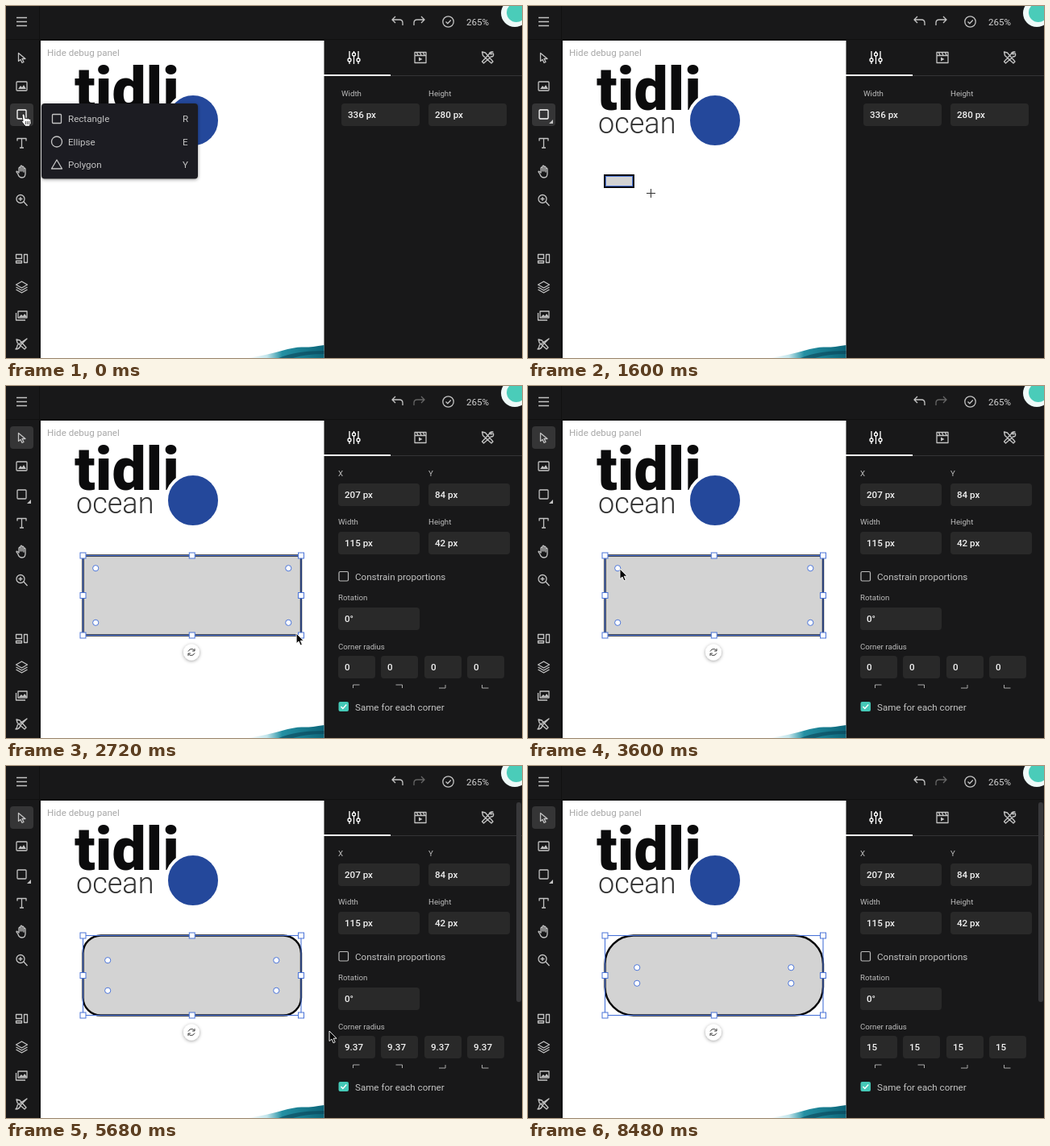
An HTML page for the animation above (9980 ms loop, 640x437 px).

```html
<!DOCTYPE html>
<html lang="en">
<head>
<meta charset="utf-8">
<title>Rounded rectangle in a design editor</title>
<style>
  html, body { margin: 0; width: 100%; height: 100%; overflow: hidden; background: #181819; }
  svg { display: block; width: 640px; height: 437px; font: 11.6px Roboto, sans-serif; }
  .icon { fill: none; stroke: #c4c4c4; stroke-width: 1.3; stroke-linejoin: round; }
  .solid { fill: #c4c4c4; stroke: none; }
  .bright { stroke: #fff; }
  .label { font-size: 9.7px; fill: #bcbcbc; }
  .value { font-weight: 500; fill: #f2f2f2; }
  .option { fill: #c4c4c4; }
  .handle { fill: #fff; stroke: #4a74d8; }
</style>
</head>
<body>
<svg viewBox="0 0 640 437">
  <defs>
    <linearGradient id="sea">
      <stop offset="0" stop-color="#fff"/>
      <stop offset=".25" stop-color="#c3e6ec"/>
      <stop offset=".45" stop-color="#2490a3"/>
      <stop offset="1" stop-color="#0d667a"/>
    </linearGradient>
    <filter id="shadow" x="-30%" y="-30%" width="160%" height="160%">
      <feDropShadow dx="0" dy="1" stdDeviation="2" flood-opacity=".4"/>
    </filter>
  </defs>

  <rect width="640" height="437" fill="#181819"/>
  <path d="M41.5 0V437M0 41.5H640" stroke="#101010"/>

  <!-- page -->
  <rect x="43" y="43" width="351.5" height="394" fill="#fff"/>
  <text x="51" y="62" fill="#a8a8a8">Hide debug panel</text>
  <text x="85" y="129" font-size="75" font-weight="900" fill="#0b0b0c">tidli</text>
  <text x="87" y="158" font-size="36" font-weight="300" fill="#333">ocean</text>
  <circle cx="232" cy="142" r="33" fill="#24489b" stroke="#fff" stroke-width="4"/>
  <path d="M300 437Q325 433 342 428T368 423.500T394.500 421V437Z" fill="url(#sea)"/>
  <path d="M338 437Q360 428 394.500 428V432Q372 432 356 437Z" fill="#0a4457" opacity=".6"/>

  <!-- top bar -->
  <g class="icon">
    <path d="M13 14.500H26M13 19.500H26M13 24.500H26"/>
    <path d="M483 13l-4 4 4 4M479 17h9q4 0 4 4v3"/>
    <path id="redo" d="M515 13l4 4-4 4M519 17h-9q-4 0-4 4v3"/>
    <circle cx="548.500" cy="19.500" r="6.700"/>
    <path d="M545.500 19.500l2.300 2.300 4-4.300"/>
  </g>
  <text x="571" y="23.500" fill="#d0d0d0">265%</text>
  <circle cx="631" cy="9" r="17" fill="#eefaf8"/>
  <circle cx="633" cy="8" r="12" fill="#4accb9"/>

  <!-- panel tabs -->
  <path d="M394 86.500H640" stroke="#343436"/>
  <path d="M394 86H477" stroke="#fff" stroke-width="2"/>
  <g class="icon bright">
    <path d="M426 56v9m0 4v3M431.500 56v2m0 4v10M437 56v9m0 4v3"/>
    <circle cx="426" cy="67" r="2"/><circle cx="431.500" cy="60" r="2"/><circle cx="437" cy="67" r="2"/>
  </g>
  <g class="icon">
    <path d="M507 57.500h14v13h-14zM507 61.500h14M509 57l2 4m2-4l2 4m2-4l2 4"/>
    <path class="solid" d="M512 63.500v5l4.500-2.500z"/>
    <path d="M590.500 57l4 1 9.500 11-2 2-10.500-9.500zM604 57q-4-1-5 3l-8.500 9 2 2 9-8q4 0 3-4l-3 1-1-1z"/>
  </g>

  <g id="live"></g>

  <!-- tool icons, above the highlighted button -->
  <g class="icon">
    <path d="M15.500 58.500v10l2.500-2 2 4 2-1-2-4h4z"/>
    <rect x="13" y="94" width="13" height="11" rx="1"/>
    <path class="solid" d="M15 103l3-4 2 2 2-3 3 5z"/>
    <rect id="shapeTool" x="14" y="129" width="11" height="11" rx="1"/>
    <path class="solid" d="M31 141v5h-5z"/>
    <path d="M14 167.500v-3h11v3M19.500 164.500v11.500M17 176h5"/>
    <path d="M16 207v-6q1-1.500 2 0v4-6q1-1.500 2 0v6-5q1-1.500 2 0v6-4q1-1.500 2 0v6q0 5-4 5t-5-4l-2-3q0-2 3 1z"/>
    <circle cx="18" cy="239.500" r="5"/>
    <path d="M22 243l4.500 5M15.500 239.500h5M18 237v5"/>
    <path d="M12.500 308.500h7v5h-7zM12.500 316.500h7v2.500h-7zM22.500 308.500h4v10h-4z"/>
    <path d="M19.500 342l7 4-7 4-7-4zM12.500 349l7 4 7-4M12.500 352l7 4 7-4"/>
    <path d="M15 379h11v8H15zM12.500 381v9H24"/>
    <path class="solid" d="M16 386l3-3 2 2 2-3 3 4z"/>
    <path d="M13 414l4 1 8 9-2 2-9-8zM26 413l-8 8q-1 5-6 5 2-2 2-4t3-3z"/>
  </g>
  <g id="overlay"></g>
</svg>

<script>
const LOOP = 9980, STEP = 80;
const at = {
  menuClosed: 800, drawStart: 1440, selected: 2400,
  radiusStart: 3920, radiusEnd: 5040, scrollbar: 5520, focused: 6400,
  highlighted: 6560, typing: 7360, secondDigit: 7600, applied: 8000
};

// Pointer stops: time, x, y
const pointerStops = [
  [0, 20, 134], [240, 20, 134], [640, 98, 140], [800, 98, 140], [1280, 95, 210],
  [1440, 95, 210], [1520, 131, 225], [1600, 152, 232], [2160, 361, 307],
  [2240, 363, 307], [2400, 366, 309], [2640, 366, 309], [3520, 114, 227],
  [3920, 114, 227], [5040, 129, 242], [5120, 129, 242], [5680, 401, 329],
  [5840, 401, 329], [6400, 413, 345], [9980, 413, 345]
];

const ease = p => p * p * (3 - 2 * p);
const progress = (t, from, to) => Math.min(1, Math.max(0, (t - from) / (to - from)));

function pointer(t) {
  const i = Math.max(1, pointerStops.findIndex(stop => stop[0] >= t));
  const [t0, x0, y0] = pointerStops[i - 1], [t1, x1, y1] = pointerStops[i];
  const p = ease(progress(t, t0, t1));
  return [x0 + (x1 - x0) * p, y0 + (y1 - y0) * p];
}

const rect = (x, y, w, h, attrs) => `<rect x="${x}" y="${y}" width="${w}" height="${h}" ${attrs}/>`;
const text = (x, y, kind, str) => `<text x="${x}" y="${y}" class="${kind}">${str}</text>`;
const path = (d, attrs) => `<path d="${d}" ${attrs}/>`;
const field = (x, y, w, value, border = "none") =>
  rect(x, y, w, 28, `rx="4" fill="#292929" stroke="${border}"`) + text(x + 8, y + 18, "value", value);

function pagePanel() {
  return text(416, 112, "label", "Width") + text(524, 112, "label", "Height") +
    field(416, 121, 97, "336 px") + field(524, 121, 97, "280 px");
}

function shapePanel(t, radius) {
  const shown = String(+radius.toFixed(2));
  const typed = t >= at.secondDigit ? "15" : t >= at.typing ? "1" : shown;
  const focused = t >= at.focused && t < at.applied;
  const highlighted = t >= at.highlighted && t < at.typing;
  const corners = ["M430.500 375v-4h8", "M483.500 371h8v4", "M537 375h8v-4", "M590.500 371v4h8"];

  let out = text(412, 112, "label", "X") + text(524, 112, "label", "Y") +
    field(412, 121, 101, "207 px") + field(524, 121, 101, "84 px") +
    text(412, 172, "label", "Width") + text(524, 172, "label", "Height") +
    field(412, 181, 101, "115 px") + field(524, 181, 101, "42 px") +
    rect(413, 230.500, 11.500, 11.500, 'rx="1.500" fill="none" stroke="#bbb" stroke-width="1.200"') +
    text(433, 240.500, "option", "Constrain proportions") +
    text(412, 266, "label", "Rotation") + field(412, 275, 101, "0°") +
    text(412, 327, "label", "Corner radius");

  [412, 465, 519, 572].forEach((x, i) => {
    const active = i === 0 && focused;
    out += field(x, 335, 46, i === 0 ? typed : shown, active ? "#e8e8e8" : "none");
  });
  if (highlighted) out += rect(419.500, 342, 23.500, 14, 'fill="#5b8cc9"') +
    text(420, 353, "value", typed);
  if (focused && t >= at.typing) out += rect(421 + 6.500 * typed.length, 342, 1, 14, 'fill="#eee"');
  out += path(corners.join(""), 'fill="none" stroke="#a8a8a8"') +
    rect(412.500, 392, 12.500, 12, 'rx="2" fill="#45c9b7"') +
    path("M415.500 398l2.300 2.500 4.500-5", 'fill="none" stroke="#fff" stroke-width="1.400"') +
    text(433, 402.500, "option", "Same for each corner");
  if (t >= at.scrollbar) out += rect(633, 45, 6, 248, 'rx="3" fill="#38383a"');
  return out;
}

function drawnShape(t) {
  const [x, y] = pointer(t - STEP);
  const w = x - 95, h = y - 210;
  if (w < 3 || h < 3) return "";
  return rect(95, 210, w, h, 'fill="#d3d3d3" stroke="#0a0a12" stroke-width="2"') +
    rect(96.500, 211.500, w - 3, h - 3, 'fill="none" stroke="#4a74d8"');
}

function selectedShape(radius) {
  const [l, top, r, bottom] = [95.500, 210.500, 366, 309.500];
  const cx = (l + r) / 2, cy = (top + bottom) / 2, inset = 15.700 + 1.600 * radius;
  let out = rect(l, top, r - l, bottom - top,
      `rx="${radius * 2.356}" fill="#d3d3d3" stroke="#050507" stroke-width="2.400"`) +
    rect(l, top, r - l, bottom - top, 'fill="none" stroke="#4a74d8" stroke-width="1.100"');
  for (const x of [l, cx, r]) for (const y of [top, cy, bottom])
    if (x !== cx || y !== cy) out += rect(x - 3.500, y - 3.500, 7, 7, 'class="handle"');
  for (const x of [l + inset, r - inset]) for (const y of [top + inset, bottom - inset])
    out += `<circle cx="${x}" cy="${y}" r="3.600" class="handle"/>`;
  return out + '<circle cx="230" cy="330.500" r="10" fill="#fff" filter="url(#shadow)"/>' +
    path("M226 329.500q1.500-3.500 5-3 2 .5 3 2.500v-3m0 3h-3M234 331.500q-1.500 3.500-5 3-2-.5-3-2.500v3m0-3h3",
      'fill="none" stroke="#444"');
}

function menu() {
  const row = (y, name, key) => text(77, y, "option", name) + text(219, y, "option", key);
  return rect(44, 121, 194, 93.500, 'rx="4" fill="#1f1f20" filter="url(#shadow)"') +
    '<g class="icon"><rect x="57.500" y="134.500" width="11" height="11" rx="1"/>' +
    '<circle cx="63" cy="168.500" r="6.500"/><path d="M63 191l6.500 11h-13z"/></g>' +
    row(144, "Rectangle", "R") + row(172.500, "Ellipse", "E") + row(201, "Polygon", "Y");
}

function cursor(t) {
  if (t >= at.typing) return "";
  const [x, y] = pointer(t);
  let shape;
  if (t < at.menuClosed) {
    shape = path("M0 1q1.500-2 3 0l1 5q1-1.500 2.500 0 1-1 2.200.3 1.500-.6 2 1l.3 4-2 4H4L-1 9q0-2 2 0z",
      'fill="#fff" stroke="#111" stroke-width=".9"') + path("M4.500 9v4M6.500 9v4M8.500 9v4", 'stroke="#111" stroke-width=".7"');
  } else if (t < at.selected) {
    shape = path("M-5 .5H6M.5-5V6", 'stroke="#333"');
  } else {
    shape = path("M0 0V12.500L3 10l2 4.800 2.200-1-2-4.600H9z", 'fill="#080808" stroke="#fff" stroke-width=".9"');
  }
  return `<g transform="translate(${x} ${y})">${shape}</g>`;
}

const find = id => document.getElementById(id);
const live = find("live"), overlay = find("overlay"), redo = find("redo"), shapeTool = find("shapeTool");

function render(t) {
  const selected = t >= at.selected;
  const radius = t >= at.applied ? 15 : 9.37 * ease(progress(t, at.radiusStart, at.radiusEnd));
  const activeTool = rect(5, selected ? 50 : 121, 29, 28, 'rx="4" fill="#353536"');
  redo.style.stroke = selected ? "#666" : "";
  shapeTool.style.stroke = selected ? "" : "#fff";
  live.innerHTML = activeTool + (selected
    ? shapePanel(t, radius) + selectedShape(radius)
    : pagePanel() + (t >= at.drawStart ? drawnShape(t) : ""));
  overlay.innerHTML = (t < at.menuClosed ? menu() : "") + cursor(t);
}

let lastStep = -1;
function tick() {
  const step = Math.min(106, Math.floor(performance.now() % LOOP / STEP));
  if (step !== lastStep) render((lastStep = step) * STEP);
  requestAnimationFrame(tick);
}
tick();
</script>
</body>
</html>
```
